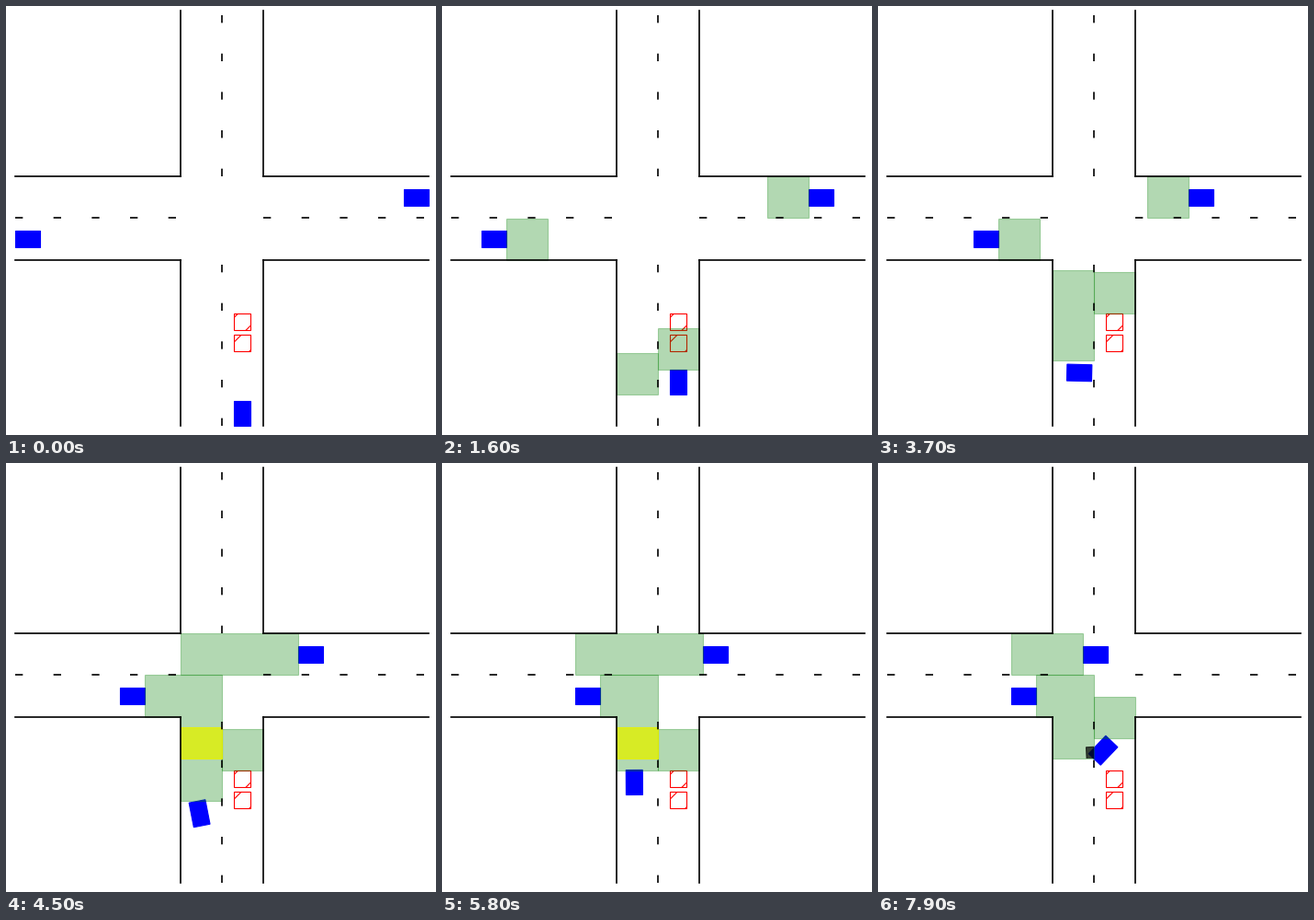
A matplotlib script that plays this animation: 468x466 px, repeating every 8000 ms.

```python
import math

import matplotlib.pyplot as plt
from matplotlib.animation import FuncAnimation
from matplotlib.patches import Polygon, Rectangle

WIDTH, HEIGHT, DPI = 468, 466, 80
UNIT = 45            # pixels per road lane
LEFT, BOTTOM = 9.5, 10.5
FRAME_MS, LOOP_MS = 100, 8000
CAR_L, CAR_W = 0.6, 0.4
STEP = 0.15          # lanes travelled per simulation step

STEP_TIMES = [0, 300, 700, 900, 1100, 1300, 1600, 1900, 2100, 2300, 2500,
              2800, 3000, 3200, 3500, 3700, 3900, 4100, 4500, 4700, 4900,
              5300, 5500, 5800, 6100, 6300, 6500, 6700,
              7000, 7200, 7400, 7600, 7700, 7900]
LAST = len(STEP_TIMES) - 1
PAUSE = 32           # step at which nobody drives


def target_heading(step):
    """Heading the turning car steers to, or None while it waits."""
    if step <= 1 or 7 <= step <= 9 or step == PAUSE:
        return None
    if 10 <= step <= 15:
        return 180
    if 27 <= step <= 31:
        return 0
    return 90


def drive():
    x, y, heading = 5.5, 0.3, 90.0
    poses = [(x, y, heading)]
    for step in range(1, LAST + 1):
        target = target_heading(step)
        if target is not None:
            heading += (target - heading) / 2
            x += STEP * math.cos(math.radians(heading))
            y += STEP * math.sin(math.radians(heading))
        poses.append((x, y, heading))
    return poses


POSES = drive()

fig = plt.figure(figsize=(WIDTH / DPI, HEIGHT / DPI), dpi=DPI, facecolor="white")
ax = fig.add_axes([0, 0, 1, 1])
ax.set_xlim(-LEFT / UNIT, (WIDTH - LEFT) / UNIT)
ax.set_ylim(-BOTTOM / UNIT, (HEIGHT - BOTTOM) / UNIT)
ax.axis("off")

for a, b in ((0, 4), (6, 10)):
    for edge in (4, 6):
        ax.plot([a, b], [edge, edge], color="black", lw=1.5)
        ax.plot([edge, edge], [a, b], color="black", lw=1.5)
    dashed = dict(color="black", lw=1.5, linestyle=(0, (5, 20)))
    ax.plot([a, b], [5, 5], **dashed)
    ax.plot([5, 5], [a, b], **dashed)

for y in (1.8, 2.3):
    ax.add_patch(Rectangle((5.3, y), 0.4, 0.4, fill=False, ec="red", lw=1, hatch="/"))

moving = []


def add(patch):
    moving.append(ax.add_patch(patch))
    return patch


def car(x, y, heading, **style):
    style = style or dict(color="blue")
    return add(Rectangle((x - CAR_L / 2, y - CAR_W / 2), CAR_L, CAR_W,
                         angle=heading, rotation_point="center", lw=1, **style))


def area(x0, y0, x1, y1, color="green", alpha=0.3):
    add(Rectangle((x0, y0), x1 - x0, y1 - y0, color=color, alpha=alpha, lw=1))


def turning_car_areas(step):
    x, y, _ = POSES[step]
    front = y + CAR_L / 2
    if step <= 9:
        area(5, front, 6, front + 1)
        if step >= 6:
            area(4, 0.75, 5, 1.75)
    elif step <= 14:
        side = 5 if step < 12 else min(5, x - CAR_L / 2)
        area(4, 0.75, side, 3.75)
        area(5, 2.7, 6, 3.7)
    elif step <= 26:
        area(4, front, 5, 3.75)
        area(5, 2.7, 6, 3.7)
    elif step <= 31:
        area(x + CAR_L / 2, 2.7, 6, 3.7)
    else:
        area(5, front, 6, front + 1)


def draw(frame):
    while moving:
        moving.pop().remove()
    step = sum(t <= frame * FRAME_MS for t in STEP_TIMES) - 1
    moves = max(0, step - 1) - (step >= PAUSE)
    east = 0.6 + STEP * min(moves, 20)     # front of the left car
    west = 9.4 - STEP * moves              # front of the right car
    crossing = step >= 18

    car(east - CAR_L / 2, 4.5, 0)
    car(west + CAR_L / 2, 5.5, 0)
    car(*POSES[step])
    if step == 0:
        return moving

    turning_car_areas(step)
    if crossing:
        area(4 if step < 21 else 3, 5, west, 6)
        add(Polygon([(east, 4), (4, 4), (4, 3), (5, 3), (5, 5), (east, 5)],
                    color="green", alpha=0.3, lw=1))
    else:
        area(west - 1, 5, west, 6)
        area(east, 4, east + 1, 5)

    if crossing and step <= 26:
        area(4, max(3, POSES[step][1] + CAR_L / 2), 5, 3.75, "yellow", 0.7)
    if step >= 26:
        # the previous pose, where it enters the left car's area
        hit = car(*POSES[step - 1], color="black", alpha=0.7)
        hit.set_clip_path(Rectangle((4, 2.99), 1.01, 1.01, transform=ax.transData))
    return moving


anim = FuncAnimation(fig, draw, frames=LOOP_MS // FRAME_MS, init_func=lambda: draw(0),
                     interval=FRAME_MS, repeat=True, repeat_delay=0, blit=False)
plt.show()
```
